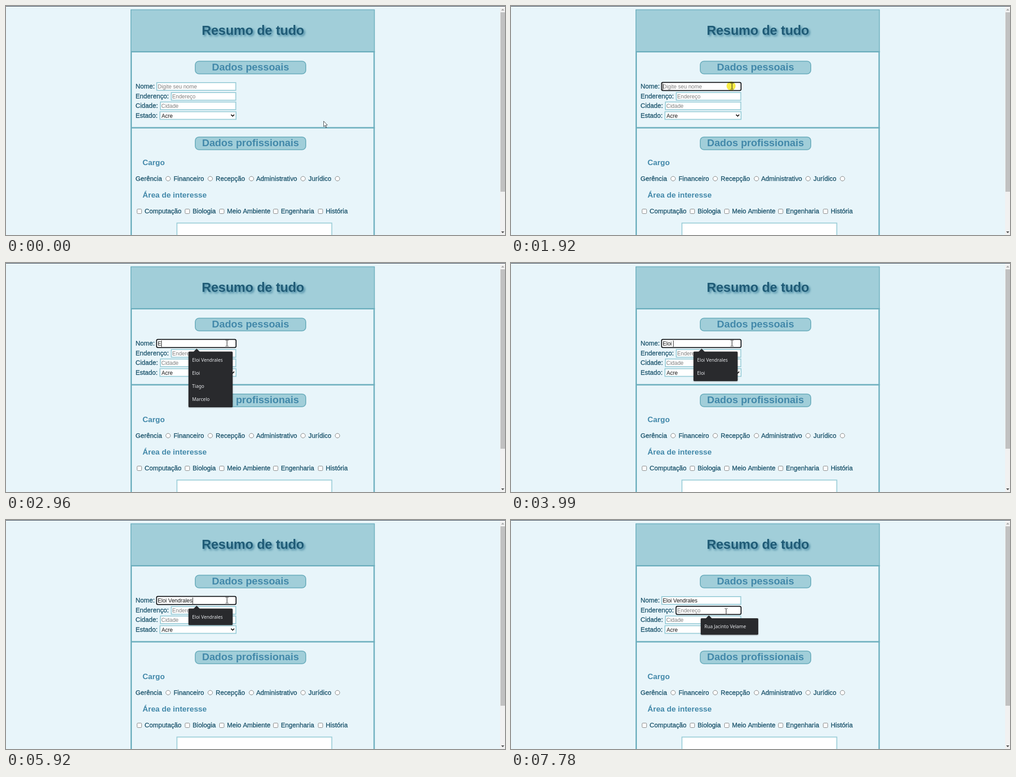
These frames come from a looping animation (1102 by 508 pixels, 8000 ms). An HTML page with a canvas:

```html
<!DOCTYPE html>
<html lang="pt">
<head>
<meta charset="utf-8">
<title>Resumo de tudo</title>
<style>
html, body { margin: 0; width: 100%; height: 100%; overflow: hidden; background: #e8f5fa; }
canvas { display: block; }
</style>
</head>
<body>
<canvas id="stage" width="1102" height="508"></canvas>
<script>
const ctx = document.getElementById('stage').getContext('2d');
const LOOP = 8000;
const SANS = '"Liberation Sans", Arial, sans-serif';
const POPUP_FONT = '10.3px "Noto Sans", "Open Sans", sans-serif';
const PAGE = '#e8f5fa', TEAL = '#a1ced9', EDGE = '#6fb0bf', FIELD = '#9acdd8';
const INK = '#1c546c', HEAD = '#4389aa';

const NAME = 'Eloi Vendrales';
const KEYS = [2960, 3190, 3720, 3860, 3990, 4380, 4770, 4980, 5180, 5310, 5530, 5630, 5730, 5920];

// time, x, y of the pointer tip or the I-beam centre
const POINTER = [
  [0, 701, 255], [350, 660, 238], [415, 589, 208], [480, 545, 191], [550, 542, 187],
  [940, 533, 179], [1010, 522, 168], [1080, 516, 162],
  [1350, 503, 165], [1440, 499, 167], [1510, 495, 169], [1580, 491, 176], [1640, 489, 177], [1710, 488, 178],
  [6720, 486, 182], [6860, 481, 192], [6920, 477, 199], [6980, 475, 203]
];
const BEAM_FROM = 1580;

// visible spans of the text caret
const CARET_NAME = [[1920, 2510], [2960, 6450], [6980, 7250]];
const CARET_STREET = [[7250, 7780]];

const within = (t, a, b) => t >= a && t < b;
const inSpans = (t, spans) => spans.some(([a, b]) => within(t, a, b));

function rect(x, y, w, h, color) {
  ctx.fillStyle = color;
  ctx.fillRect(x, y, w, h);
}

function box(x, y, w, h, r, fill, edge, line) {
  ctx.beginPath();
  ctx.roundRect(x + line / 2, y + line / 2, w - line, h - line, r);
  ctx.fillStyle = fill;
  ctx.fill();
  ctx.strokeStyle = edge;
  ctx.lineWidth = line;
  ctx.stroke();
}

function text(str, x, y, font, color, align = 'left') {
  ctx.font = font;
  ctx.fillStyle = color;
  ctx.textAlign = align;
  ctx.fillText(str, x, y);
}

function label(str, x, y) {
  text(str, x, y, `14.4px ${SANS}`, INK);
  ctx.strokeStyle = INK;
  ctx.lineWidth = 0.35;
  ctx.strokeText(str, x, y);
}

function input(x, y, w, str, color, focused) {
  if (focused) box(x - 0.5, y - 0.5, w + 1, 20, 3, '#fff', '#0c0f12', 2);
  else box(x, y, w, 19, 0, '#fff', FIELD, 2);
  text(str, x + 3, y + 14, `12px ${SANS}`, color);
}

function polygon(points, color) {
  ctx.beginPath();
  points.forEach(([x, y]) => ctx.lineTo(x, y));
  ctx.closePath();
  ctx.fillStyle = color;
  ctx.fill();
}

function pill(y, str) {
  box(417, y, 246, 30, 8, TEAL, EDGE, 2);
  text(str, 540, y + 21.5, `bold 22.4px ${SANS}`, HEAD, 'center');
}

function scrollbar() {
  rect(1091, 1, 11, 507, '#f1f1f1');
  rect(1092, 14, 10, 398, '#c1c1c1');
  polygon([[1093.5, 10], [1097, 6], [1100.5, 10]], '#a8a8a8');
  polygon([[1093.5, 500], [1100.5, 500], [1097, 504]], '#505050');
}

function page() {
  rect(0, 0, 1102, 508, PAGE);
  scrollbar();
  rect(0, 0, 1102, 1, '#1b2433');

  rect(275, 100, 3, 408, EDGE);
  rect(811.5, 100, 3, 408, EDGE);
  box(275, 7.5, 539.5, 94.5, 0, TEAL, EDGE, 1.8);
  rect(275, 100, 539.5, 3, EDGE);
  rect(275, 268.5, 539.5, 3.2, EDGE);

  ctx.save();
  ctx.shadowColor = 'rgba(45, 115, 145, .75)';
  ctx.shadowOffsetX = 3;
  ctx.shadowOffsetY = 3;
  ctx.shadowBlur = 4;
  text('Resumo de tudo', 545.3, 64, `bold 28.9px ${SANS}`, '#1f5b76', 'center');
  ctx.restore();

  pill(121.5, 'Dados pessoais');
  pill(289.7, 'Dados profissionais');
  text('Cargo', 301.5, 353, `bold 17px ${SANS}`, HEAD);
  text('Área de interesse', 301.5, 425, `bold 17px ${SANS}`, HEAD);

  [['Gerência', 286, 358], ['Financeiro', 370, 451], ['Recepção', 463, 542],
   ['Administrativo', 552.5, 656], ['Jurídico', 668, 732]].forEach(([str, x, cx]) => {
    label(str, x, 388);
    box(cx - 5.5, 377.5, 11, 11, 5, '#fff', '#767676', 1);
  });
  [['Computação', 306, 294], ['Biologia', 412, 400], ['Meio Ambiente', 488, 476],
   ['Engenharia', 607, 595], ['História', 706, 694]].forEach(([str, x, cx]) => {
    label(str, x, 460);
    box(cx - 5, 450, 11, 11, 2, '#fff', '#767676', 1);
  });
  box(376.5, 480.5, 344, 60, 0, '#fff', FIELD, 2);
}

function form(t) {
  const typed = NAME.slice(0, KEYS.filter(k => t >= k).length);
  label('Nome:', 286, 183);
  label('Enderenço:', 286, 205);
  label('Cidade:', 286, 226);
  label('Estado:', 286, 248);
  input(332, 169, 176.5, typed || 'Digite seu nome', typed ? '#111' : '#808080', within(t, 1920, 7250));
  input(364, 191, 144.5, 'Endereço', '#808080', t >= 7250);
  input(340, 212, 168.5, 'Cidade', '#808080');
  input(339, 233.5, 170, '', '#111');
  text('Acre', 343.5, 248, `12px ${SANS}`, '#111');

  ctx.beginPath();
  ctx.moveTo(497, 241);
  ctx.lineTo(500.5, 244.5);
  ctx.lineTo(504, 241);
  ctx.strokeStyle = '#111';
  ctx.lineWidth = 1.9;
  ctx.stroke();

  if (inSpans(t, CARET_NAME)) {
    ctx.font = `12px ${SANS}`;
    rect(335 + Math.round(ctx.measureText(typed).width), 172, 1, 14, '#111');
  }
  if (inSpans(t, CARET_STREET)) rect(368, 193, 1, 14, '#111');
}

function popup(x, y, w, tip, rows) {
  const h = 7.5 + 29 * rows.length;
  ctx.save();
  ctx.shadowColor = 'rgba(0, 0, 0, .35)';
  ctx.shadowBlur = 3;
  ctx.shadowOffsetY = 1;
  ctx.beginPath();
  ctx.roundRect(x, y, w, h, 2);
  ctx.fillStyle = '#292a2d';
  ctx.fill();
  ctx.restore();
  polygon([[tip - 7, y + 0.5], [tip, y - 6.5], [tip + 7, y + 0.5]], '#292a2d');
  rows.forEach((str, i) => text(str, x + 8, y + 22 + 29 * i, POPUP_FONT, '#e8eaed'));
}

function popups(t) {
  const rows = [NAME, 'Eloi', 'Tiago', 'Marcelo'];
  const count = t < 3060 ? 4 : t < 4380 ? 2 : 1;
  if (within(t, 1990, 6000)) popup(403, 196.5, 97.5, 421, rows.slice(0, count));
  if (t >= 7310) popup(419, 218, 127, 437, ['Rua Jacinto Velame']);
}

function glow(x, y) {
  ctx.save();
  ctx.globalCompositeOperation = 'multiply';
  ctx.beginPath();
  ctx.arc(x, y, 10, 0, 7);
  ctx.fillStyle = '#f8ec45';
  ctx.fill();
  ctx.restore();
}

function arrow(x, y) {
  ctx.save();
  ctx.translate(x, y);
  ctx.beginPath();
  [[0.5, 0.5], [0.5, 12.6], [3.2, 10], [5.3, 15], [7.1, 14.2], [5, 9.3], [8.9, 9.1]]
    .forEach(([px, py]) => ctx.lineTo(px, py));
  ctx.closePath();
  ctx.fillStyle = '#fff';
  ctx.fill();
  ctx.strokeStyle = '#20282c';
  ctx.lineWidth = 0.9;
  ctx.stroke();
  ctx.restore();
}

function beam(x, y) {
  rect(x - 0.5, y - 6, 1.2, 12, '#222');
  for (const dy of [-7, 6]) {
    rect(x - 3, y + dy, 2.5, 1, '#333');
    rect(x + 0.7, y + dy, 2.5, 1, '#333');
  }
}

function pointer(t) {
  const [, x, y] = POINTER.filter(p => t >= p[0]).pop();
  if (within(t, 1920, 2040) || within(t, 7250, 7310)) glow(x - 2, y - 0.5);
  (t < BEAM_FROM ? arrow : beam)(x, y);
}

const start = performance.now();

function draw() {
  const t = (performance.now() - start) % LOOP;
  page();
  form(t);
  popups(t);
  pointer(t);
  requestAnimationFrame(draw);
}
draw();
</script>
</body>
</html>
```
